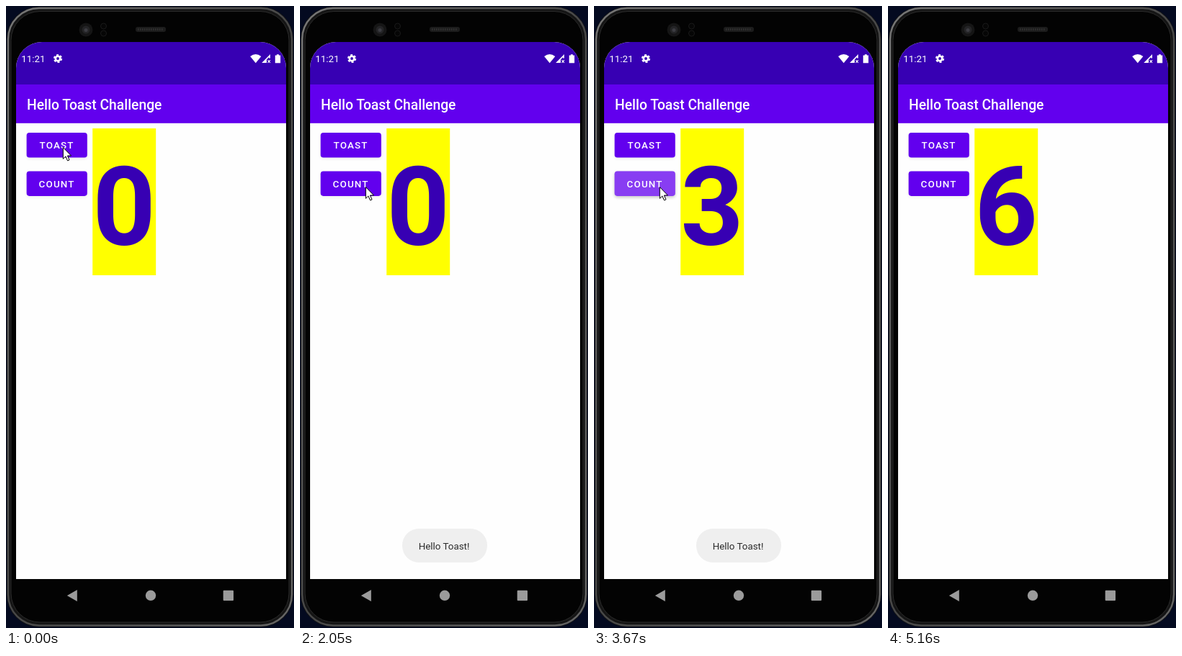
These frames come from a looping animation (400x864 px, 5.54 s). An HTML page:

```html
<!DOCTYPE html>
<html lang="en">
<head>
<meta charset="utf-8">
<title>Hello Toast Challenge</title>
<style>
html, body { margin: 0; width: 100%; height: 100%; overflow: hidden; background: #040a20; }
svg { display: block; width: 400px; height: 864px; font-family: Roboto, sans-serif; }
.label { font-size: 13.37px; font-weight: 500; letter-spacing: .0893em; fill: #fff; }
</style>
</head>
<body>
<svg viewBox="0 0 400 864">
  <defs>
    <linearGradient id="rim" x1="0" x2="1" y1="0" y2="1">
      <stop offset="0" stop-color="#777"/>
      <stop offset=".5" stop-color="#484848"/>
      <stop offset="1" stop-color="#666"/>
    </linearGradient>
    <filter id="blur" x="-20%" y="-40%" width="140%" height="180%"><feGaussianBlur stdDeviation="2"/></filter>
  </defs>

  <!-- phone body -->
  <rect width="400" height="864" fill="#040a20"/>
  <rect x="1" y="1" width="398" height="861.5" rx="45" fill="#151515"/>
  <rect x="3" y="3" width="394" height="857.5" rx="43" fill="#151515" stroke="url(#rim)" stroke-width="2.4"/>
  <rect x="7" y="7.5" width="386" height="848.5" rx="40" fill="#030303" stroke="#2a2a2a"/>
  <circle cx="111" cy="33" r="9.5" fill="#151515"/>
  <circle cx="111" cy="33" r="5.5" fill="#242426"/>
  <circle cx="111" cy="33.5" r="2.5" fill="#3c3c42"/>
  <g fill="#060606" stroke="#1a1a1a">
    <circle cx="135.5" cy="28" r="4"/>
    <circle cx="135.5" cy="38" r="4"/>
  </g>
  <rect x="180" y="29" width="42" height="7" rx="3" fill="#1c1c1c"/>
  <path d="M183 32.5H219" stroke="#303030" stroke-width="3" stroke-dasharray="1.5 1.5"/>

  <!-- screen -->
  <path d="M14 796V86A36 36 0 0 1 50 50H353A36 36 0 0 1 389 86V796Z" fill="#fefefe"/>
  <path d="M14 109V86A36 36 0 0 1 50 50H353A36 36 0 0 1 389 86V109Z" fill="#3700b3"/>
  <rect x="14" y="109" width="375" height="53.8" fill="#6200ee"/>
  <text x="21.3" y="78.3" font-size="13.3" fill="#fff">11:21</text>
  <g fill="none" stroke="#fff">
    <circle cx="72" cy="73" r="3.2" stroke-width="2.6"/>
    <circle cx="72" cy="73" r="5" stroke-width="2.2" stroke-dasharray="2.9 2.336"/>
  </g>
  <g fill="#fff">
    <path d="M346.8 79.2L339.2 70Q346.8 64 354.4 70Z"/>
    <path d="M355.2 79L367 67V72.5H365.3V71L362 74.5V79Z"/>
    <path d="M363.6 75.2L367 78.8M367 75.2L363.6 78.8" stroke="#fff" stroke-width="1.1"/>
    <path d="M373.8 68.6H376V67.2H379V68.6H381.2V79.2H373.8Z"/>
  </g>
  <text x="29" y="143.6" font-size="19.3" font-weight="500" fill="#fff">Hello Toast Challenge</text>

  <rect x="120.2" y="170" width="88" height="204" fill="#ff0"/>
  <text id="digit" x="120.2" y="331.6" font-size="152.8" font-weight="700" fill="#3700b3">0</text>
  <g id="buttons"></g>

  <g id="toast" opacity="0">
    <rect x="142" y="726" width="118" height="47" rx="23.2" fill="#efefef"/>
    <text x="164.7" y="754.8" font-size="13.37" fill="#2b2b2b">Hello Toast!</text>
  </g>

  <!-- navigation -->
  <g fill="#9b9b9b">
    <path d="M84.8 819L98.8 811V827Z"/>
    <circle cx="201" cy="818.8" r="7.2"/>
    <rect x="301.7" y="811.7" width="14.3" height="14.3" rx="1"/>
  </g>

  <path id="cursor" d="M0 0V15.8L3.6 12.4L6.2 18.4L8.7 17.3L6.1 11.5H11.2Z" fill="#fff" stroke="#000"/>
</svg>
<script>
const LOOP = 5540, STEP = 125, SHIFT = 15;   // the screen refreshes once per STEP
const GROW = 225, FADE = 130;                // ripple times
const TOAST_IN = 890, TOAST_OUT = 4720;

const $ = id => document.getElementById(id);
const clamp = v => Math.max(0, Math.min(1, v));
const mix = (a, b, k) => a + (b - a) * k;

function add(parent, tag, attrs, text = '') {
  const el = document.createElementNS('http://www.w3.org/2000/svg', tag);
  set(el, attrs);
  el.textContent = text;
  return parent.appendChild(el);
}

function set(el, attrs) {
  for (const name in attrs) el.setAttribute(name, attrs[name]);
}

function makeButton(text, x, y) {
  const box = { x: 28.6, y, width: 84.2, height: 34.5, rx: 3.8 }, id = 'clip' + text;
  const shade = add($('buttons'), 'rect', { ...box, y: y + 2, filter: 'url(#blur)' });
  add(add($('buttons'), 'clipPath', { id }), 'rect', box);
  add($('buttons'), 'rect', { ...box, fill: '#6200ee' });
  const waves = add($('buttons'), 'g', { 'clip-path': `url(#${id})`, fill: '#fff' });
  add($('buttons'), 'text', { class: 'label', x, y: y + 22.2 }, text);
  return { shade, waves, cx: 71, cy: y + 17 };
}

const toastBtn = makeButton('TOAST', 46.6, 176);
const countBtn = makeButton('COUNT', 45.6, 229.4);
const buttons = [toastBtn, countBtn];

const taps = [];
function tap(button, press, hold, x, y) {
  taps.push({ button, press, release: press + hold, x, y, wave: add(button.waves, 'circle', {}) });
}
tap(toastBtn, 640, 140, 79, 196);
tap(countBtn, 2120, 370, 91, 251);
tap(countBtn, 2850, 150, 91, 251);
for (let i = 0; i < 4; i++) tap(countBtn, 3440 + 208 * i, 190, 91, 251);

// pointer stops: time, x, y
const stops = [[0, 79, 196], [1800, 79, 196], [1990, 91, 251], [4140, 91, 251], [4265, 93, 260], [4700, 371, 833]];

function pointer(t) {
  const i = stops.findIndex(s => s[0] > t);
  if (i < 0) return stops.at(-1).slice(1);
  const [t0, x0, y0] = stops[i - 1], [t1, x1, y1] = stops[i], k = (t - t0) / (t1 - t0);
  return [mix(x0, x1, k), mix(y0, y1, k)];
}

function draw(time) {
  const t = Math.max(0, Math.floor((time - SHIFT) / STEP) * STEP + SHIFT);

  for (const { button, press, release, x, y, wave } of taps) {
    const k = clamp((t - press) / GROW) ** .8;
    const out = clamp((t - Math.max(release, press + GROW)) / FADE);
    set(wave, { cx: mix(x, button.cx, k), cy: mix(y, button.cy, k), r: 52 * k, opacity: .24 * (1 - out) });
  }

  for (const b of buttons) {
    const lifted = taps.some(p => p.button === b && t > p.press + 80 && t < p.press + GROW);
    set(b.shade, { opacity: lifted ? .22 : .06 });
  }

  $('digit').textContent = taps.filter(p => p.button === countBtn && t >= p.release).length;
  set($('toast'), { opacity: Math.min(clamp((t - TOAST_IN) / 300), 1 - clamp((t - TOAST_OUT) / 400)) });
  const [x, y] = pointer(t);
  set($('cursor'), { transform: `translate(${x + .3} ${y + .5})`, opacity: t < 4800 ? 1 : 0 });
}

let start;
function frame(now) {
  start ??= now;
  draw((now - start) % LOOP);
  requestAnimationFrame(frame);
}
draw(0);
requestAnimationFrame(frame);
</script>
</body>
</html>
```
